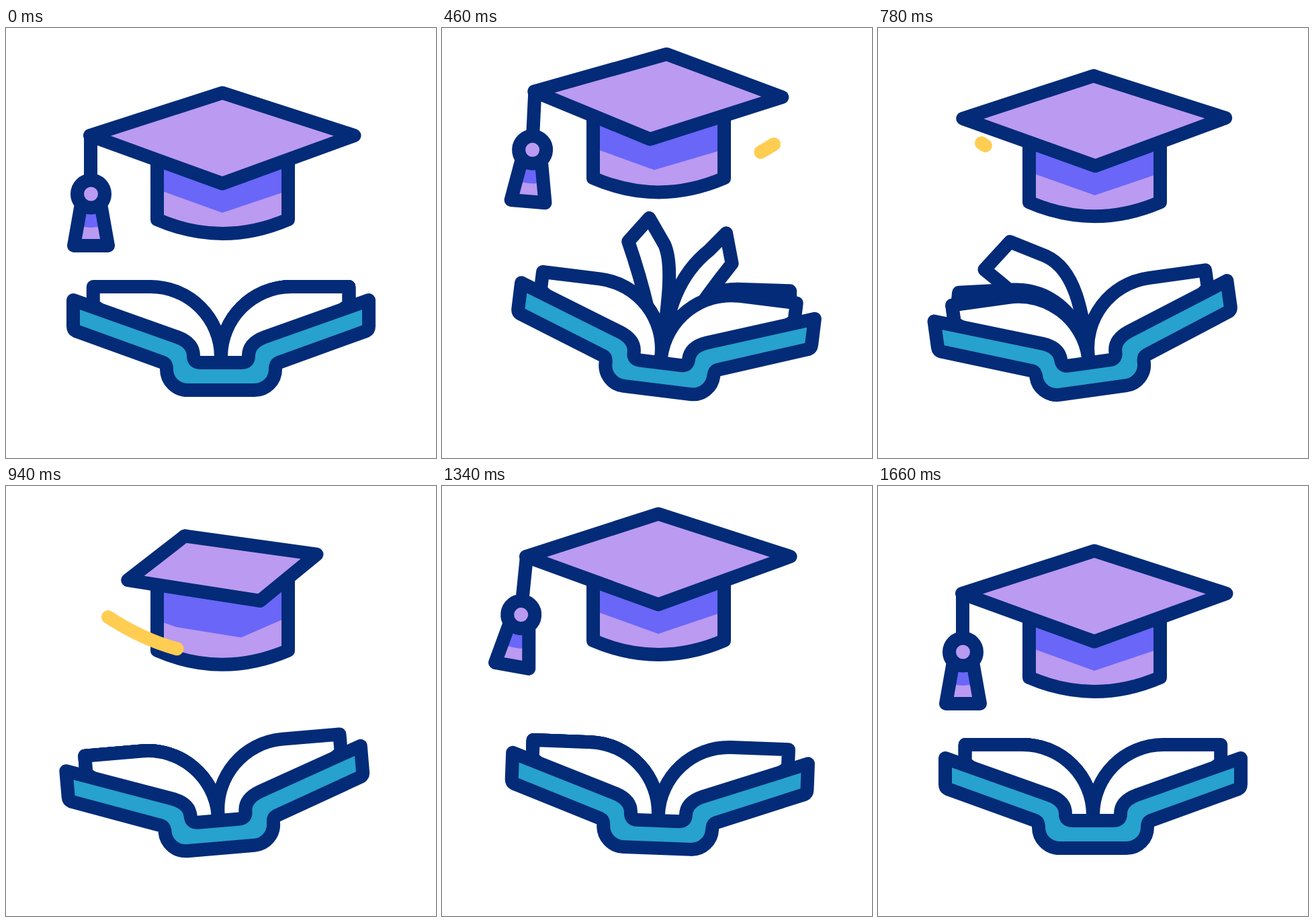
An HTML page for the animation above (1820 ms loop, 640 px wide and 640 px high).

```html
<!DOCTYPE html>
<html lang="en">
<head>
<meta charset="utf-8">
<title>Graduation cap and book</title>
<style>
  html, body { margin: 0; width: 100%; height: 100%; overflow: hidden; background: #fff; }
  svg { display: block; width: 100%; height: 100%; }
  .line { stroke: #032b78; stroke-width: 20; stroke-linejoin: round; stroke-linecap: round; }
  .none { fill: none; }
  .white { fill: #fff; }
  .teal { fill: #27a1cd; }
  .lilac { fill: #bb9af1; }
  .violet { fill: #6a66f8; }
  #trail { fill: none; stroke: #ffcd52; stroke-width: 20; stroke-linecap: round; }
</style>
</head>
<body>
<svg viewBox="0 0 640 640">
  <g id="book">
    <g id="leaves"></g>
    <path class="line teal" d="M100 405L255 460Q279 469 279 488Q279 498 289 498L351 498Q361 498 361 488
      Q361 469 385 460L540 405V444Q540 449 536 451L406 498Q401 500 401 508A31 31 0 0 1 370 539
      H270A31 31 0 0 1 239 508Q239 500 234 498L104 451Q100 449 100 444Z"/>
  </g>
  <g id="cap">
    <g id="tassel">
      <path class="line none" d="M0 0V87"/>
      <g id="tuft">
        <path class="lilac" d="M-14 15L-25 77H26L15 15Z"/>
        <path class="violet" d="M-14 15L-20 47Q.5 53 21 47L15 15Z"/>
        <path class="line none" d="M-14 15L-25 77H26L15 15Z"/>
      </g>
      <circle class="line lilac" cx="0.5" cy="87" r="20.5"/>
    </g>
    <path class="lilac" d="M225 165V285Q322 327 420 285V165Z"/>
    <polygon id="shade" class="violet"/>
    <path class="line none" d="M225 165V285Q322 327 420 285V165"/>
    <polygon id="board" class="line lilac"/>
  </g>
  <path id="trail" pathLength="1" d="M152 170Q323 282 494 173"/>
</svg>
<script>
const LOOP = 1820, BEAT = 400;
const el = id => document.getElementById(id);
const mix = (a, b, f) => a + (b - a) * f;
const mixAll = (a, b, f) => a.map((v, i) => mix(v, b[i], f));
const clamp = u => Math.min(1, Math.max(0, u));
const smooth = (t, from, to) => {
  const u = clamp((t - from) / (to - from));
  return u * u * (3 - 2 * u);
};

// Eases through values spaced evenly in time, resting briefly at each.
const steps = (t, gap, values) => values.slice(1).reduce(
  (sum, v, i) => sum + (v - values[i]) * smooth(t, i * gap, (i + 1) * gap), values[0]);

// A leaf stands on the gutter; bend and tip swing around it on arcs.
const GUTTER = { x: 320, y: 490 };
const onArc = (degrees, radius) => {
  const a = degrees * Math.PI / 180;
  return [GUTTER.x + radius * Math.cos(a), GUTTER.y - radius * Math.sin(a)];
};

// bend angle, radius, tip angle, radius, bend handle x, y, edge x, y, root handle
const flat = [45, 148.5, 28.9, 217.3, -58, 0, 0, 27, 58];
const rising = [68.5, 176, 63, 209, -53, 44, 22, 45, 72];
const falling = [104.7, 165, 115.6, 208, 44, 27, -44, 36, 64];
const landed = flat.map((v, i) => i === 0 || i === 2 ? 180 - v : i === 4 ? -v : v);

function leafPath(f) {
  const pose = f < 0.28 ? mixAll(flat, rising, f / 0.28)
    : f < 0.71 ? mixAll(rising, falling, (f - 0.28) / 0.43)
    : mixAll(falling, landed, (f - 0.71) / 0.29);
  const [bendAngle, bendRadius, tipAngle, tipRadius, hx, hy, ex, ey, root] = pose;
  const [bx, by] = onArc(bendAngle, bendRadius);
  const [tx, ty] = onArc(tipAngle, tipRadius);
  const edge = [tx + ex, ty + ey];
  const { x, y } = GUTTER;
  return `M${x} ${y}C${[x, y - root, bx + hx, by + hy, bx, by]}L${[tx, ty]}L${edge}`
    + `Q${[mix(x, edge[0], 0.3), edge[1] + 100, x, y + 25]}Z`;
}

// Back to front; leaves fall faster the later they start to turn over.
const turns = [
  { start: 360, length: 500, power: 1.95 },
  { start: 60, length: 740, power: 1.8 },
  { start: 0, length: 685, power: 1.3 }
];
const addLeaf = f => {
  const path = document.createElementNS(el('cap').namespaceURI, 'path');
  path.setAttribute('class', 'line white');
  path.setAttribute('d', leafPath(f));
  return el('leaves').appendChild(path);
};
const turning = turns.map(() => addLeaf(0));
[1, 0].forEach(addLeaf);

// Each corner slides straight to its neighbour's place.
const corners = [[125, 160], [322, 96.5], [518.5, 160], [322, 231.5]];
const boardAt = turn => corners.map((c, i) => mixAll(c, corners[(i + 1) % 4], turn));
const shadow = [[225, 240], [322, 275], [420, 242], [420, 218]];
const shadeAt = turn => [[225, 165],
  ...shadow.map((c, i) => mixAll(c, shadow[Math.max(0, i - 1)], turn)), [420, 165]];

function drawTrail(t) {
  const back = t >= 2 * BEAT;
  const head = back ? smooth(t, 800, 1180) : smooth(t, 400, 800);
  const tail = back ? smooth(t, 990, 1180) : smooth(t, 600, 800);
  const length = head - tail, trail = el('trail');
  trail.style.display = length > 0.001 ? '' : 'none';
  trail.setAttribute('transform', `translate(0 ${back ? 25 : 0})`);
  trail.setAttribute('stroke-dasharray', `${length} 2`);
  trail.setAttribute('stroke-dashoffset', back ? -tail : head - 1);
}

function draw(t) {
  const tilt = steps(t, BEAT, [0, 8, -8, 3, 0]);
  el('book').setAttribute('transform', `rotate(${tilt} 320 540)`);
  turns.forEach(({ start, length, power }, i) =>
    turning[i].setAttribute('d', leafPath(clamp((t - start) / length) ** power)));

  const turn = steps(t, BEAT, [0, 0, 1, 0]);
  const board = boardAt(turn);
  const swing = steps(t - 400, 200, [0, 12.5, 0]) + steps(t - 800, 280, [0, -9.5, 6, 0]);
  el('cap').setAttribute('transform', `translate(0 ${steps(t, BEAT, [0, -64, -25.5, -77, 0])})`);
  el('board').setAttribute('points', board);
  el('shade').setAttribute('points', shadeAt(turn));
  el('tassel').setAttribute('transform',
    `translate(${board[0][0] + 1} ${board[0][1]}) rotate(${swing})`);
  el('tuft').setAttribute('transform', `translate(0 87) rotate(${swing * 0.75})`);
  drawTrail(t);
}

const start = performance.now();
function tick() {
  draw((performance.now() - start) % LOOP);
  requestAnimationFrame(tick);
}
tick();
</script>
</body>
</html>
```
